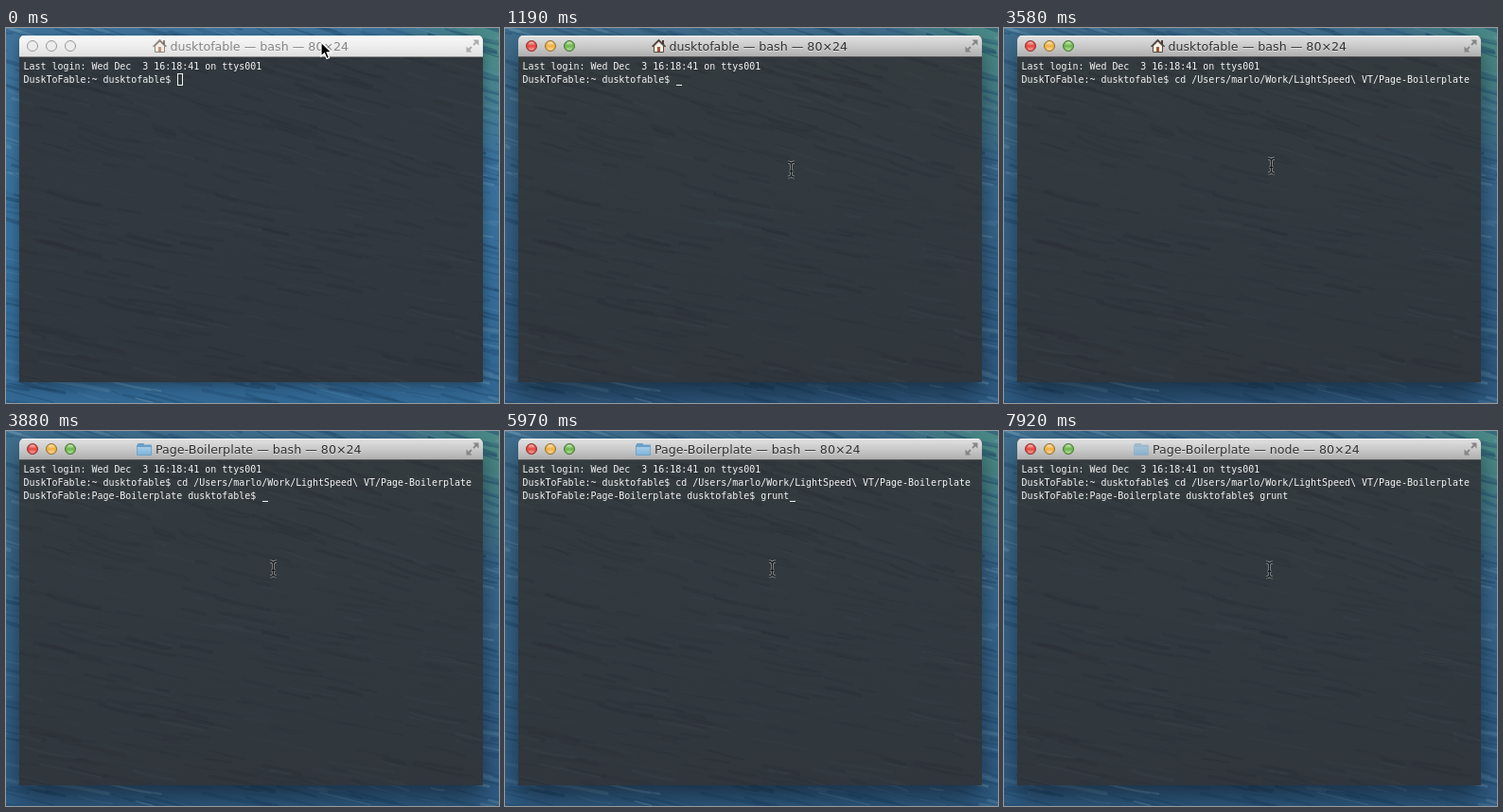
Write an HTML page with a canvas that moves like this. It is 521 px wide and 397 px high and loops after 8000 ms.

```html
<!DOCTYPE html>
<html lang="en">
<head>
<meta charset="utf-8">
<title>Terminal</title>
<style>
html, body { margin: 0; width: 100%; height: 100%; overflow: hidden; background: #2c5a80; }
canvas { display: block; }
</style>
</head>
<body>
<canvas id="stage" width="521" height="397"></canvas>
<script>
const W = 521, H = 397, LOOP = 8000;
const ctx = document.getElementById('stage').getContext('2d');

const USER = 'dusktofable', HOST = 'DuskToFable', DIR = 'Page-Boilerplate';
const LOGIN = 'Last login: Wed Dec  3 16:18:41 on ttys001';
const PROMPT = `${HOST}:~ ${USER}$ `;
const COMMAND = `cd /Users/marlo/Work/LightSpeed\\ VT/${DIR}`;
const PROMPT2 = `${HOST}:${DIR} ${USER}$ `;

// Each entry: start time, then values; no values means hidden.
const caret = [[0], [150, 27, 1], [590], [1190, 27, 1], [1630], [2080, 27, 1], [2680],
  [2830, 0, 2], [3580], [3880, 42, 2], [4630], [5080, 42, 2], [5230, 43, 2], [5530, 44, 2],
  [5680, 45, 2], [5830, 46, 2], [5970, 47, 2], [6570], [7020, 0, 3], [7620]];
const typed = [[0, ''], [5230, 'g'], [5530, 'gr'], [5680, 'gru'], [5830, 'grun'], [5970, 'grunt']];
const beam = [[0], [1190, 302.5, 150], [1340, 293.5, 182], [1630, 282.5, 159], [1780, 282.5, 146], [7920, 280.5, 147]];
const at = (list, t) => list.findLast(e => e[0] <= t).slice(1);

function gradient(c, y0, y1, ...colors) {
  const g = c.createLinearGradient(0, y0, 0, y1);
  colors.forEach((color, i) => g.addColorStop(i / (colors.length - 1), color));
  return g;
}

function poly(c, points, close = true) {
  c.beginPath();
  points.forEach(([x, y]) => c.lineTo(x, y));
  if (close) c.closePath();
}

function disc(c, x, y, r, fill, line) {
  c.beginPath();
  c.arc(x, y, r, 0, 7);
  c.fillStyle = fill;
  c.fill();
  c.strokeStyle = line;
  c.stroke();
}

function randomizer(seed) {
  return () => (seed = seed * 16807 % 2147483647) / 2147483647;
}

function ripples(c, seed, count, thickness, colors, alpha) {
  const rnd = randomizer(seed);
  c.save();
  c.lineCap = 'round';
  for (let i = 0; i < count; i++) {
    const x = rnd() * 620 - 80, y = rnd() * 440 - 30, len = 12 + rnd() * 60;
    const slope = 0.15 + 0.12 * rnd() + (y < 170 ? 0.08 : 0);
    c.globalAlpha = alpha * (0.4 + rnd());
    c.lineWidth = 0.6 + rnd() * thickness;
    c.strokeStyle = colors[i % colors.length];
    c.beginPath();
    c.moveTo(x, y);
    c.quadraticCurveTo(x + len / 2, y + len * slope * (0.2 + rnd() * 0.7), x + len, y + len * slope);
    c.stroke();
  }
  c.restore();
}

function fullscreenIcon(c, color) {
  c.fillStyle = c.strokeStyle = color;
  c.lineWidth = 1.8;
  for (const [x, y, d] of [[499.5, 12.5, -1], [486.5, 25.5, 1]]) {
    poly(c, [[x, y], [x + 6 * d, y], [x, y - 6 * d]]);
    c.fill();
    poly(c, [[x + 2 * d, y - 2 * d], [x + 5.5 * d, y - 5.5 * d]], false);
    c.stroke();
  }
  c.lineWidth = 1;
}

function backdrop(active) {
  const canvas = document.createElement('canvas');
  canvas.width = W;
  canvas.height = H;
  const c = canvas.getContext('2d');

  c.fillStyle = active ? gradient(c, 0, H, '#40708f', '#38688f', '#2f5b83')
                       : gradient(c, 0, H, '#3f739b', '#37709d', '#316793');
  c.fillRect(0, 0, W, H);
  const glow = c.createRadialGradient(521, 20, 5, 521, 20, 120);
  glow.addColorStop(0, '#4b8d88');
  glow.addColorStop(1, 'rgba(75,141,136,0)');
  c.fillStyle = glow;
  c.fillRect(0, 0, W, H);
  ripples(c, 71, 900, 3.6, ['#1d4568', '#6695b4', '#28557d', '#204a6e'], 0.36);

  c.save();
  c.shadowColor = active ? 'rgba(0,0,0,.5)' : 'rgba(0,0,0,.35)';
  c.shadowBlur = active ? 30 : 14;
  c.shadowOffsetY = active ? 12 : 4;
  c.fillStyle = '#30373d';
  c.beginPath();
  c.roundRect(14, 8, 490, 367, [5, 5, 1, 1]);
  c.fill();
  c.restore();

  c.save();
  c.clip();
  c.fillStyle = active ? gradient(c, 30, 375, '#343b3f', '#31393f', '#30363c')
                       : gradient(c, 30, 375, '#31393f', '#31383f', '#2f363d');
  c.fillRect(14, 30, 490, 345);
  ripples(c, 29, 700, 3.6, ['#2a2e35', '#384147', '#2c3037'], 0.34);
  c.fillStyle = active ? gradient(c, 8, 30, '#e2e2e2', '#cacaca', '#afafaf')
                       : gradient(c, 8, 30, '#f8f8f8', '#eeeeee', '#dfdfdf');
  c.fillRect(14, 8, 490, 22);
  c.fillStyle = active ? '#f2f2f2' : '#ffffff';
  c.fillRect(14, 8, 490, 1);
  c.fillStyle = active ? '#565656' : '#8a8a8a';
  c.fillRect(14, 30, 490, 1);
  c.restore();

  const lights = active ? [['#e5443c', '#8e3a35'], ['#eeb03c', '#93703a'], ['#6bb548', '#4b7a3a']]
                        : Array(3).fill(['#ececec', '#999999']);
  lights.forEach(([fill, line], i) => {
    const x = 28 + 20 * i;
    disc(c, x, 19, 5.5, fill, line);
    if (!active) return;
    c.fillStyle = gradient(c, 14, 24, 'rgba(255,255,255,.8)', 'rgba(255,255,255,0)', 'rgba(255,255,255,.6)');
    c.beginPath();
    c.ellipse(x, 19, 3.8, 4.6, 0, 0, 7);
    c.fill();
  });
  fullscreenIcon(c, active ? '#858585' : '#aaaaaa');
  return canvas;
}

function house(x, y) {
  ctx.fillStyle = '#f4efe6';
  ctx.strokeStyle = '#564a40';
  ctx.lineWidth = 1;
  poly(ctx, [[x + 2.5, y + 7], [x + 7.5, y + 2], [x + 12.5, y + 7], [x + 12.5, y + 13.5], [x + 2.5, y + 13.5]]);
  ctx.fill();
  ctx.stroke();
  ctx.fillStyle = '#a5552f';
  ctx.fillRect(x + 6, y + 8, 3, 5);
  ctx.fillStyle = '#4b3d35';
  ctx.fillRect(x + 11, y + 1, 2, 4);
  ctx.lineWidth = 1.5;
  ctx.strokeStyle = '#4b3d35';
  poly(ctx, [[x + 0.5, y + 7.8], [x + 7.5, y + 0.8], [x + 14.5, y + 7.8]], false);
  ctx.stroke();
}

function folder(x, y) {
  ctx.fillStyle = '#6b9fc6';
  ctx.beginPath();
  ctx.roundRect(x + 1, y, 7, 5, 1);
  ctx.roundRect(x, y + 1.5, 16, 11.5, 1);
  ctx.fill();
  ctx.fillStyle = gradient(ctx, y + 3, y + 13, '#a9d0ea', '#7db0d6');
  ctx.fillRect(x + 0.8, y + 4, 14.4, 8.2);
}

function title(t) {
  const home = t < 3880, node = t >= 7170;
  const x = home ? 155 : node ? 137 : 138;
  ctx.save();
  ctx.globalAlpha = t < 150 ? 0.6 : node ? 0.5 : 1;
  (home ? house : folder)(x, home ? 12 : 13);
  ctx.restore();
  ctx.font = '12.65px "DejaVu Sans", sans-serif';
  const label = `${home ? USER : DIR} — ${node ? 'node' : 'bash'} — 80×24`;
  const tx = x + (home ? 18.5 : 20);
  ctx.fillStyle = 'rgba(255,255,255,.5)';
  ctx.fillText(label, tx, 25);
  ctx.fillStyle = t < 150 ? '#858585' : '#303030';
  ctx.fillText(label, tx, 24);
}

function terminal(t) {
  const lines = [LOGIN, PROMPT + (t < 2680 ? '' : COMMAND)];
  if (t >= 3880) lines.push(PROMPT2 + at(typed, t)[0]);
  ctx.font = '9.966px "DejaVu Sans Mono", monospace';
  ctx.fillStyle = ctx.strokeStyle = '#f4f4f4';
  ctx.lineWidth = 1;
  lines.forEach((line, i) => ctx.fillText(line, 18.5, 44 + 14 * i));
  if (t < 150) ctx.strokeRect(181.5, 48.5, 5, 12);
  const [col, row] = at(caret, t);
  if (row) ctx.fillRect(19 + 6 * col, 46 + 14 * row, 6, 1);
}

function arrow(x, y) {
  poly(ctx, [[0, 0], [0, 15], [3.5, 11.8], [6, 17.5], [8.6, 16.4], [6.2, 10.8], [11, 10.8]]
    .map(([dx, dy]) => [x + dx, y + dy]));
  ctx.fillStyle = '#000000';
  ctx.strokeStyle = '#ffffff';
  ctx.lineWidth = 1.2;
  ctx.fill();
  ctx.stroke();
}

function ibeam(x, y) {
  ctx.beginPath();
  for (const d of [-1, 1]) {
    ctx.moveTo(x - 3.5, y + 8 * d);
    ctx.quadraticCurveTo(x, y + 8 * d, x, y + 5 * d);
    ctx.quadraticCurveTo(x, y + 8 * d, x + 3.5, y + 8 * d);
  }
  ctx.moveTo(x, y - 6);
  ctx.lineTo(x, y + 6);
  ctx.moveTo(x - 2, y + 1.5);
  ctx.lineTo(x + 2, y + 1.5);
  for (const [width, color] of [[2.8, '#9a9d9f'], [1.3, '#15181a']]) {
    ctx.lineWidth = width;
    ctx.strokeStyle = color;
    ctx.stroke();
  }
}

const inactive = backdrop(false), active = backdrop(true);

function draw(now) {
  const t = now % LOOP;
  ctx.drawImage(t < 150 ? inactive : active, 0, 0);
  title(t);
  terminal(t);
  const [x, y] = at(beam, t);
  if (x) ibeam(x, y);
  else arrow(333, 15);
}

const start = performance.now();
function tick() {
  draw(performance.now() - start);
  requestAnimationFrame(tick);
}
tick();
</script>
</body>
</html>
```
